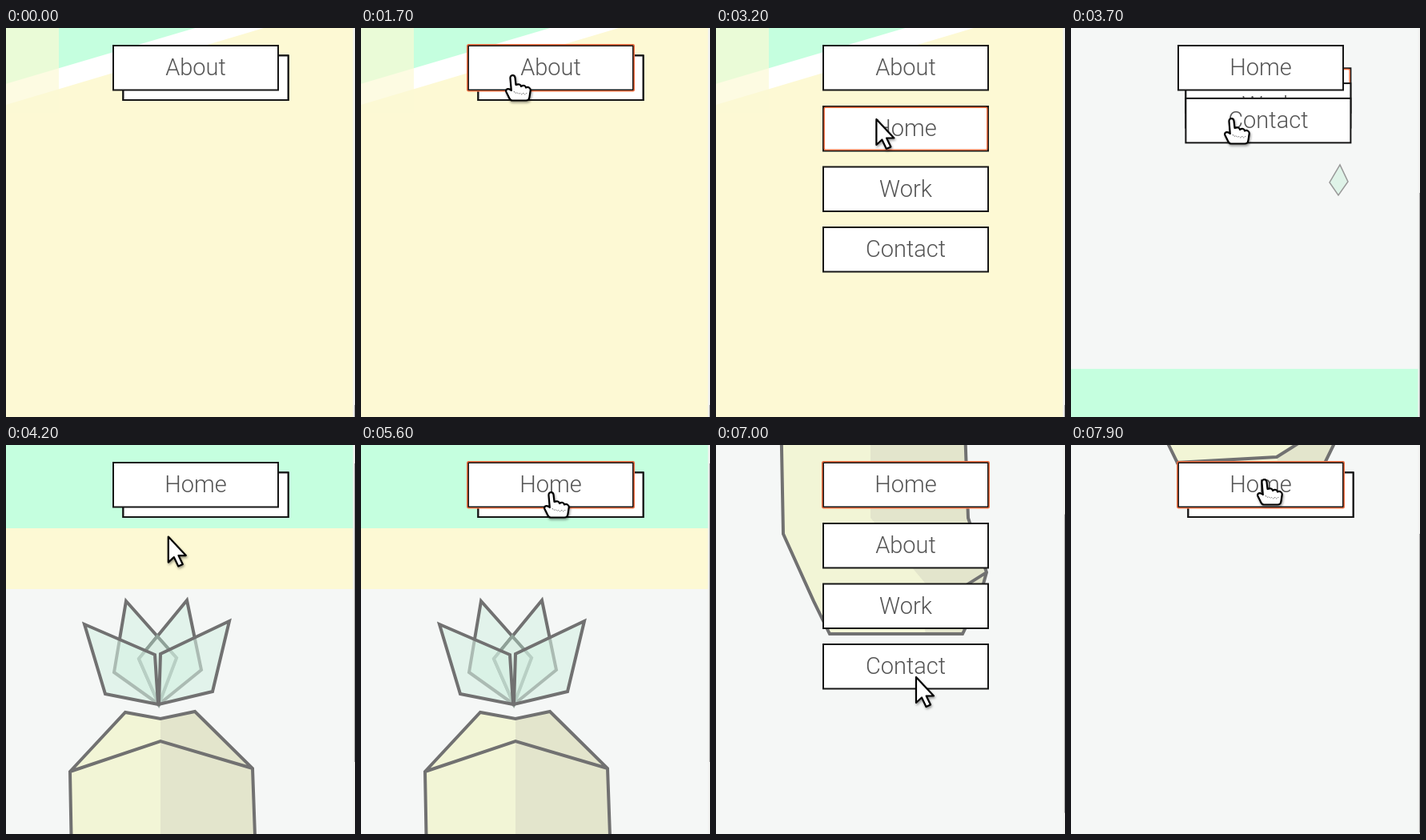
An HTML page that plays this animation: 436x486 px, repeating every 8000 ms.

```html
<!DOCTYPE html>
<html lang="en">
<head>
<meta charset="utf-8">
<title>Stacked menu</title>
<style>
  html, body { margin: 0; width: 100%; height: 100%; overflow: hidden; background: #f5f7f6; }
  svg { display: block; width: 436px; height: 486px; }
  text { font: 300 29px Roboto, sans-serif; fill: #555; text-anchor: middle; }
  .card { fill: #fff; stroke: #161616; stroke-width: 2; }
  .focus { fill: none; stroke: #ee6f42; stroke-width: 1.5; }
  .line { stroke: #717171; stroke-width: 4; stroke-linejoin: miter; }
  .leaf { fill: rgba(214, 242, 228, .58); }
  .pointer { fill: #fff; stroke: #000; stroke-width: 2.2; stroke-linejoin: round; }
  #cursor { filter: drop-shadow(1px 2px 1.5px rgba(0, 0, 0, .4)); }
</style>
</head>
<body>
<svg viewBox="0 0 436 486">
  <g id="page">
    <rect y="-10" width="436" height="114" fill="#c5ffdf"/>
    <rect y="104" width="436" height="76" fill="#fdf9d4"/>
    <rect y="180" width="436" height="1710" fill="#f5f7f6"/>
    <rect y="1890" width="436" height="1800" fill="#c5ffdf"/>

    <!-- fruit body -->
    <path fill="#f2f5d6" d="M80 408L149 334 193 342 236 333 308 404 315 600 338 668 328 704 308 745H142L122 704 84 620Z"/>
    <path fill="#e3e5cc" d="M193 342L236 333 308 404 315 600 338 668 328 704 308 745H262L257 719 280 704 193 600Z"/>
    <path class="line" fill="none" d="M80 408L149 334 193 342 236 333 308 404 315 600 338 668 328 704 308 745H142L122 704 84 620ZL193 370 308 404M131 726L257 719 338 668"/>

    <!-- crown -->
    <path class="line leaf" d="M150 195L213 266 191 324 135 284Z"/>
    <path class="line leaf" d="M226 194L244 281 191 324 166 267Z"/>
    <path fill="#dcefe5" stroke="#8fa198" stroke-width="4" d="M189 239L213 266 191 324 166 267Z"/>
    <path class="line leaf" d="M98 224L186 262 190 324 124 311Z"/>
    <path class="line leaf" d="M279 220L193 261 191 324 258 308Z"/>

    <path fill="#dff3e8" stroke="#999" stroke-width="1.5" d="M336 1635L346 1656 334 1673 323 1657Z"/>

    <!-- slanted section -->
    <g transform="translate(0 3584)">
      <path fill="#fff" d="M0 69.8L436 -59V500H0Z"/>
      <path fill="#fdf9d4" d="M0 96L436 -34V500H0Z"/>
      <rect y="-84" width="66" height="190" fill="#fdf9d4" opacity=".68"/>
    </g>
  </g>

  <rect x="433.5" width="2.5" height="486" fill="#f1f2f0"/>
  <rect id="thumb" x="435" width="1" height="373" fill="#b0b0b0"/>

  <g id="menu"></g>

  <g id="cursor">
    <path id="arrow" class="pointer" d="M1 1V33L8 26.5 13.5 38 19 35.5 13.7 24.5H23Z"/>
    <g id="hand" transform="translate(-9 -1)">
      <path class="pointer" d="M6.5 5C6 0 12 0 12.5 4L13.5 13C17 11.5 19.5 12.5 20 15 23 13 25.5 14 26 16.5 29 15 32 17 31.7 20L30.5 28C30 31.5 29 32.5 26 32.5H9C6 32.5 6 31 4.5 28L1.5 22C0 18.5 4 16.5 7.8 20Z"/>
      <path fill="none" stroke="#555" stroke-width="1" stroke-dasharray="1.5 1.5" d="M11 21q2 4 4 1q2 4 4 1q2 4 4 0q2 4 4 0"/>
    </g>
  </g>
</svg>
<script>
const LOOP = 8000, STEP = 100, BOTTOM = 3584;
const $ = id => document.getElementById(id);
const part = (t, from, to) => Math.min(1, Math.max(0, (t - from) / (to - from)));
const sine = p => (1 - Math.cos(Math.PI * p)) / 2;
const outCubic = p => 1 - (1 - p) ** 3;
const move = (el, x, y) => el.setAttribute('transform', `translate(${x} ${y})`);
const show = (el, on) => el.setAttribute('visibility', on ? 'visible' : 'hidden');

// time, x, y, hand shape
const path = [
  [0, 139, 500, 0], [200, 139, 500, 0], [900, 181, 250, 0], [1000, 181, 250, 0],
  [1500, 189, 59, 1], [2500, 189, 59, 1], [2900, 199, 113, 0], [3600, 200, 113, 1],
  [3800, 200, 113, 0], [4100, 200, 113, 0], [4800, 236, 125, 0], [5100, 237, 59, 1],
  [5700, 237, 59, 1], [6200, 247, 296, 0], [6400, 249, 289, 0], [7300, 249, 289, 0],
  [7600, 241, 43, 1], [8000, 241, 43, 1]
];

function makeCard(inset) {
  const g = document.createElementNS('http://www.w3.org/2000/svg', 'g');
  g.innerHTML = `<rect class="card" x="1" y="1" width="206" height="55.5"/>
    <text x="104" y="38"></text>
    <rect class="focus" x="${inset}" y="${inset}" width="${208 - 2 * inset}" height="${57.5 - 2 * inset}" rx="1.5"/>`;
  $('menu').append(g);
  return { g, label: g.querySelector('text'), focus: g.querySelector('.focus') };
}
const slots = [0, 1, 2].map(() => makeCard(2.2));
const head = makeCard(-.25);
move(head.g, 133, 21);

function scrollAt(t) {
  return t < 6400
    ? BOTTOM * (1 - sine(part(t, 3387.2, 3947.2)))
    : 704 * sine(part(t, 6450, 7300));
}

function openness(t) {
  const start = t < 5600 ? 1700 : 5600;
  const close = t < 5600 ? 3433 : 7500;
  return outCubic(part(t, start, start + 1150)) * (1 - sine(part(t, close, close + 400)));
}

function drawMenu(t) {
  const q = openness(t), home = t >= 3400;
  const names = [home ? 'About' : 'Home', 'Work', 'Contact'];
  slots.forEach((s, i) => {
    const openY = 97 + 75.5 * i;
    move(s.g, 145.5 - 12.5 * q, 33.5 + (openY - 33.5) * q);
    s.label.textContent = names[i];
    show(s.focus, i === 0 && t >= 2900 && t < 5600);
  });
  head.label.textContent = home ? 'Home' : 'About';
  show(head.focus, (t >= 1700 && t < 2900) || t >= 5600);
}

function drawCursor(t) {
  const i = path.findLastIndex(p => p[0] <= t);
  const [t0, x0, y0, hand] = path[i];
  const [t1, x1, y1] = path[i + 1];
  const p = sine(part(t, t0, t1));
  move($('cursor'), x0 + (x1 - x0) * p, y0 + (y1 - y0) * p);
  show($('hand'), hand);
  show($('arrow'), !hand);
}

function draw(t) {
  const scroll = scrollAt(t);
  move($('page'), 0, -scroll);
  $('thumb').setAttribute('y', 23 + scroll / 8);
  drawMenu(t);
  drawCursor(t);
}

const begin = performance.now();
function tick() {
  // the small lead absorbs timer rounding
  const t = (performance.now() - begin + 2) % LOOP;
  draw(Math.floor(t / STEP) * STEP);
  requestAnimationFrame(tick);
}
tick();
</script>
</body>
</html>
```
